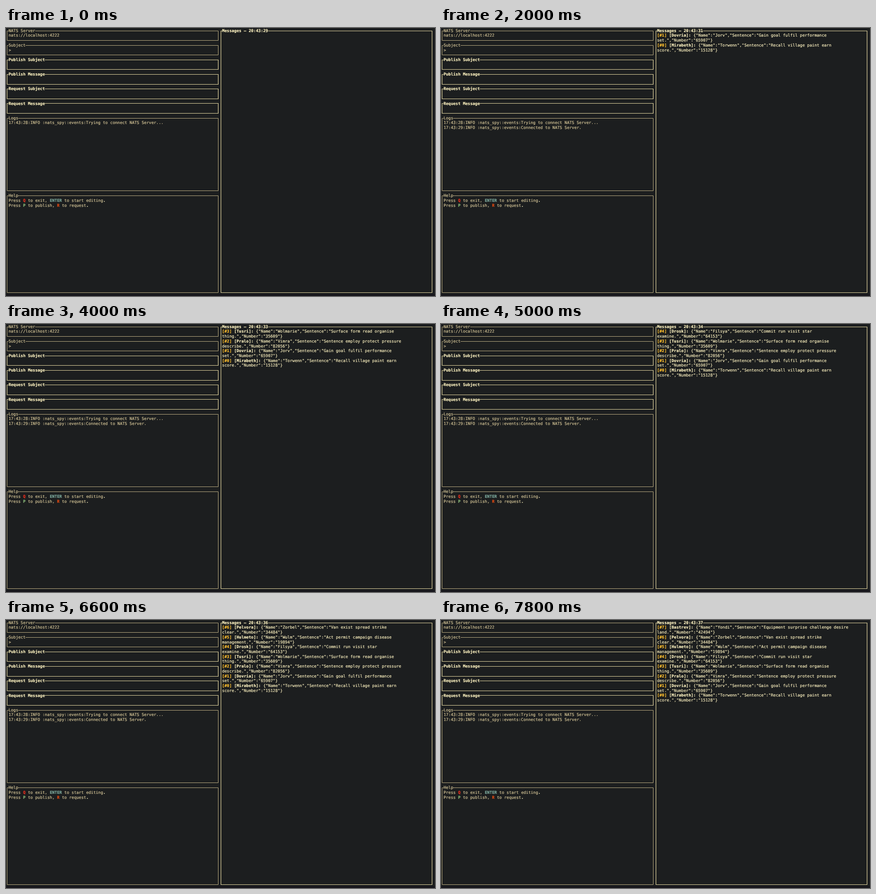
An HTML page for the animation above (8 s loop, 947 by 592 pixels).

```html
<!DOCTYPE html>
<html lang="en">
<head>
<meta charset="utf-8">
<title>Terminal message monitor</title>
<style>
  html, body { margin: 0; width: 100%; height: 100%; overflow: hidden; background: #1c1e1f; }
  svg { display: block; width: 947px; height: 592px; }
  text {
    font: 8.895px "DejaVu Sans Mono", monospace;
    white-space: pre;
    text-rendering: geometricPrecision;
    stroke-width: .2px;
  }
  .bold { font-weight: bold; }
</style>
</head>
<body>
<svg id="screen" viewBox="0 0 947 592">
  <rect width="947" height="592" fill="#1c1e1f"/>
  <rect y="588" width="947" height="4" fill="#17161c"/>
</svg>
<script>
const LOOP = 8000, CELL_W = 5.355, CELL_H = 10.72, MARGIN_X = .3;
const TICK_OFFSET = 600, CONNECTED_AT = 200;
const DIM = '#d8c899', BRIGHT = '#fdf2c0';
const DIM_LINE = '#bdae82', BRIGHT_LINE = '#e6d9a2';
const screen = document.getElementById('screen');

function add(parent, tag, attrs) {
  const node = document.createElementNS('http://www.w3.org/2000/svg', tag);
  for (const key in attrs) node.setAttribute(key, attrs[key]);
  return parent.appendChild(node);
}

const cellX = col => col * CELL_W + MARGIN_X;
const lineX = col => Math.floor(cellX(col + .5)) + .5;
const lineY = row => Math.floor(row * CELL_H + 6.1) + .5;

function write(parent, col, row, content, fill = DIM, bold = false) {
  const node = add(parent, 'text', {
    x: cellX(col), y: row * CELL_H + 8.7, fill, stroke: fill, class: bold ? 'bold' : ''
  });
  node.textContent = content;
  return node;
}

// Writes consecutive [text, colour, bold] runs on the character grid.
function writeRuns(parent, col, row, runs) {
  for (const [content, fill, bold] of runs) {
    write(parent, col, row, content, fill, bold);
    col += content.length;
  }
}

function panel(left, right, top, bottom, title, bright) {
  const [x1, x2, y1, y2] = [lineX(left), lineX(right), lineY(top), lineY(bottom)];
  const titleStart = cellX(left + 1);
  const titleEnd = cellX(left + 1 + title.length);
  add(screen, 'path', {
    d: `M${titleEnd} ${y1}H${x2}V${y2}H${x1}V${y1}H${titleStart}`,
    fill: 'none',
    stroke: bright ? BRIGHT_LINE : DIM_LINE,
    'stroke-width': bright ? 1.2 : 1
  });
  return write(screen, left + 1, top, title, bright ? BRIGHT : DIM, bright);
}

panel(0, 87, 0, 2, 'NATS Server');
panel(0, 87, 3, 5, 'Subject');
['Publish Subject', 'Publish Message', 'Request Subject', 'Request Message']
  .forEach((title, i) => panel(0, 87, 6 + i * 3, 8 + i * 3, title, true));
panel(0, 87, 18, 33, 'Logs');
panel(0, 87, 34, 54, 'Help');
const heading = panel(88, 175, 0, 54, 'Messages – 20:43:29', true);

write(screen, 1, 1, 'nats://localhost:4222');
write(screen, 1, 4, '>');
write(screen, 1, 19, '17:43:28:INFO :nats_spy::events:Trying to connect NATS Server...');
const connected = write(screen, 1, 20, '17:43:29:INFO :nats_spy::events:Connected to NATS Server.');

writeRuns(screen, 1, 35, [
  ['Press '], ['Q', '#f5301d', true], [' to exit, '],
  ['ENTER', '#7fada0', true], [' to start editing'], ['.', BRIGHT, true]
]);
writeRuns(screen, 1, 36, [
  ['Press '], ['P', '#8ec07c', true], [' to publish, '],
  ['R', '#ee4d12', true], [' to request'], ['.', BRIGHT, true]
]);

// subject, name, first line of the sentence, wrapped last word, number
const messages = [
  ['Mirabeth', 'Torwenn', 'Recall village paint earn', 'score', 15128],
  ['Dovria', 'Jorv', 'Gain goal fulfil performance', 'set', 65907],
  ['Pralo', 'Vimra', 'Sentence employ protect pressure', 'describe', 82056],
  ['Tusri', 'Wolmarie', 'Surface form read organise', 'thing', 35609],
  ['Drosk', 'Filsya', 'Commit run visit star', 'examine', 64153],
  ['Hulmeto', 'Wulm', 'Act permit campaign disease', 'management', 19894],
  ['Pelvora', 'Zorbel', 'Van exist spread strike', 'clear', 34484],
  ['Bastrev', 'Yondi', 'Equipment surprise challenge desire', 'land', 42494]
].map(([subject, name, sentence, lastWord, number], i) => {
  const group = add(screen, 'g', {});
  writeRuns(group, 89, 1, [
    [`[#${i}] `, '#fabd2f', true],
    [`[${subject}]: `, BRIGHT, true],
    [`{"Name":"${name}","Sentence":"${sentence}`, BRIGHT]
  ]);
  write(group, 89, 2, `${lastWord}.","Number":"${number}"}`, BRIGHT);
  return group;
});

function render() {
  const time = performance.now() % LOOP;
  const ticks = Math.floor((time + TICK_OFFSET) / 1000);
  heading.textContent = `Messages – 20:43:${29 + ticks}`;
  connected.style.display = time >= CONNECTED_AT ? '' : 'none';
  messages.forEach((group, i) => {
    const age = ticks - 1 - i;
    group.style.display = age >= 0 ? '' : 'none';
    group.setAttribute('transform', `translate(0 ${Math.max(age, 0) * 2 * CELL_H})`);
  });
  requestAnimationFrame(render);
}
render();
</script>
</body>
</html>
```
